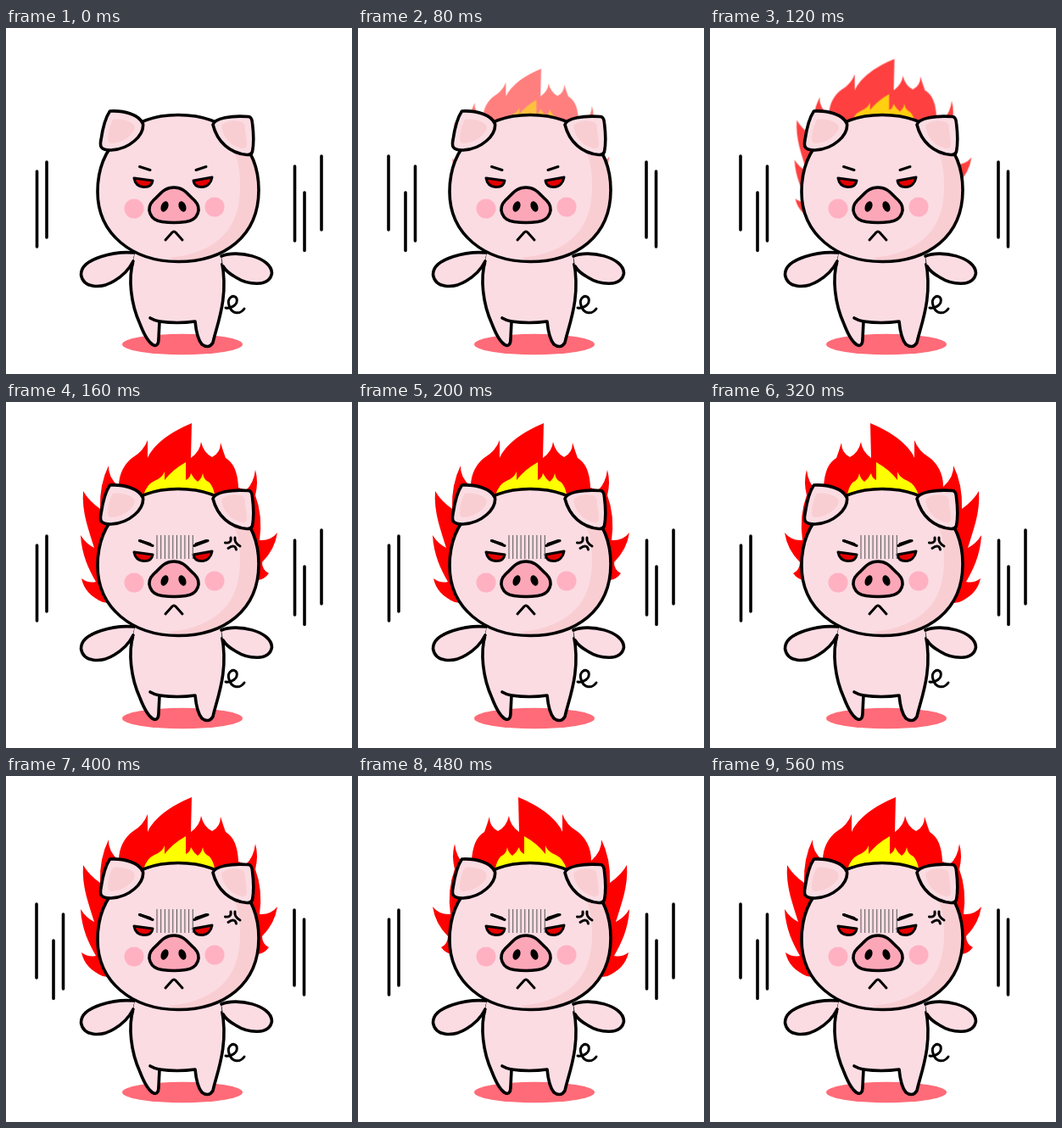
Animation of 408 by 408 pixels, one loop 600 ms. Source, as an HTML page:

```html
<!DOCTYPE html>
<html lang="en">
<head>
<meta charset="utf-8">
<title>Angry pig</title>
<style>
  html, body { margin: 0; width: 100%; height: 100%; overflow: hidden; background: #fff; }
  svg { display: block; width: 100vw; height: 100vh; }
  .ink { fill: none; stroke: #000; stroke-width: 3.6; stroke-linecap: round; stroke-linejoin: round; }
  .fine { stroke-width: 3; }
  .skin { fill: #fbdce3; }
  .shade { fill: #f9ced2; }
  .speed { animation: swap .6s step-end infinite; }
  .pair { transform-origin: 194px 0; }
  .trio { transform-origin: 204px 0; }
  .fire { transform-origin: 204px 140px; animation: blaze .6s step-end infinite; }
  .rage { animation: rage .6s step-end infinite; }

  /* each group of lines jumps to the other side */
  @keyframes swap {
    0%, 26.66%, 53.33%, 80% { transform: none; }
    13.33%, 40%, 66.66%, 93.33%, 100% { transform: scaleX(-1); }
  }
  /* grows in, then flickers by mirroring */
  @keyframes blaze {
    0% { transform: scale(.6); fill-opacity: 0; }
    6.66% { transform: scale(.7); fill-opacity: .25; }
    13.33% { transform: scale(.8); fill-opacity: .5; }
    20% { transform: scale(.9); fill-opacity: .75; }
    26.66%, 66.66%, 93.33%, 100% { transform: scale(1); fill-opacity: 1; }
    53.33%, 80% { transform: scale(-1, 1); fill-opacity: 1; }
  }
  @keyframes rage {
    0% { opacity: 0; }
    26.66%, 100% { opacity: 1; }
  }
</style>
</head>
<body>
<svg viewBox="0 0 408 408">
  <defs>
    <path id="head" d="M203 102.500C262 102.500 298 140 298 191C298 246 257 275.500 203 275.500C149 275.500 108 243 108 193C108 140 146 102.500 203 102.500Z"/>
  </defs>

  <ellipse cx="208" cy="373" rx="71" ry="12.300" fill="#ff6b78"/>

  <g class="fire">
    <path fill="#f00" d="M114 236C101 230 92 222 89 208Q97 214 106 212C98 198 89 180 88 157Q94 167 104 172C98 152 89 130 91 105Q97 116 111 126Q110 97 121 75Q120 88 133 100C133 84 140 72 150 65Q162 58 167 45L167 66C174 50 194 35 219 25L218 66Q229 58 230 47Q233 60 243 65Q253 60 253 48Q256 58 259 66Q273 74 274 101L283 104Q292 96 294 80Q298 94 294 110Q303 134 299 163Q312 164 320 154Q317 174 302 189Q302 198 310 202Q304 210 296 210L204 250Z"/>
    <path fill="#ff0" d="M162 110Q166 97 175 93Q185 89 187 82L187 92Q196 80 212 71L212 92Q217 90 218 84Q221 90 226 94Q231 90 232 84Q233 92 240 95Q245 101 246 110Z"/>
  </g>

  <g class="ink">
    <path class="speed pair" d="M36.500 169V258M48 158V247"/>
    <path class="speed trio" d="M340.500 163V251M352 194V262.500M372 151V238"/>
  </g>

  <g class="ink">
    <path class="skin" d="M150 275C144 295 147 325 158 349C163 362 168 371 174 374Q180 376 180 366L181 346Q202 349 223 346Q225 366 231 373Q239 379 244 371C248 352 263 318 254.500 276L250 262H155Z"/>
    <path d="M170 342Q175 345 181 346"/>
    <path class="skin" stroke="none" d="M152 264L150 276L165 285V262ZM253 266L254.500 277L240 284V264Z"/>
    <path class="skin" d="M151 265C130 263 88 271 88.500 291C91 307 112 308 128 298Q143 289 150 275"/>
    <path class="skin" d="M254 269C272 261 313 270 313.500 289C311 306 285 303 271 294Q260 288 256 281"/>
    <path class="fine" d="M259 330C266 331 274 326 272 319C269 313 260 318 263 327C266 338 276 338 281 331"/>
  </g>

  <use href="#head" class="skin"/>
  <path class="shade" d="M238 106C266 127 277 156 276 186C276 224 262 264 192 271L204 275C257 275 298 246 298 191C298 150 276 118 238 106Z"/>
  <use href="#head" class="ink"/>

  <g class="ink">
    <path class="skin" d="M122.500 98C139 97 157 102 161.500 113C163 126 146 143 124 144C111 144.500 110.500 139 112 132C114 118 117 106 122.500 98Z"/>
    <path class="skin" d="M244 114C246 106 266 103 286 104.500Q290 105 290.500 112C292 124 292.500 136 290.500 146Q289 150 284 149.500C264 148 249 134 244 114Z"/>
  </g>
  <path class="shade" d="M126 108C138 106 151 111 152 117C151 126 137 136 124 136Q119 135 120 129Q121 116 126 108Z"/>
  <path class="shade" d="M254 116C256 110 270 108 279 111Q282 113 282 119L284 137Q284 143 278 142C265 139 256 129 254 116Z"/>

  <g fill="#ffb1c2">
    <circle cx="151" cy="213" r="11.500"/>
    <circle cx="246" cy="211" r="11.500"/>
  </g>

  <g class="ink fine">
    <path fill="#e60000" d="M151 177L173 180C172 186 168 188 162 187.500C156 187 152 183 151 177Z"/>
    <path fill="#e60000" d="M243 176L221 180C222 186 226 188 232 187.500C238 187 242 182 243 176Z"/>
    <path d="M157.500 163.500L170 167.500M224 167.500L236 163.500"/>
    <path d="M188 250L196 241Q198 239 200 241L208 250"/>
  </g>

  <g class="rage">
    <path stroke="#555" stroke-width="28" stroke-dasharray="1 3.700" d="M177.500 171H221"/>
    <path class="ink fine" d="M157.500 163.500L173 169.500M222 169.500L238 163.500"/>
    <path class="ink fine" d="M258.500 166Q266 167 265 160M270 160Q269 166 276 170M262 172.500Q270 167 271.500 174"/>
  </g>

  <path class="ink" style="fill:#fba7b8" d="M198 188C210 188 214 196 222 203C232 213 226 227 212 228.500Q198 230.500 184 228.500C170 227 164 213 174 203C182 196 186 188 198 188Z"/>
  <ellipse cx="187" cy="210.500" rx="4.200" ry="6.500" transform="rotate(22 187 210.500)"/>
  <ellipse cx="208" cy="210.500" rx="4.200" ry="6.500" transform="rotate(-22 208 210.500)"/>
</svg>
</body>
</html>
```
